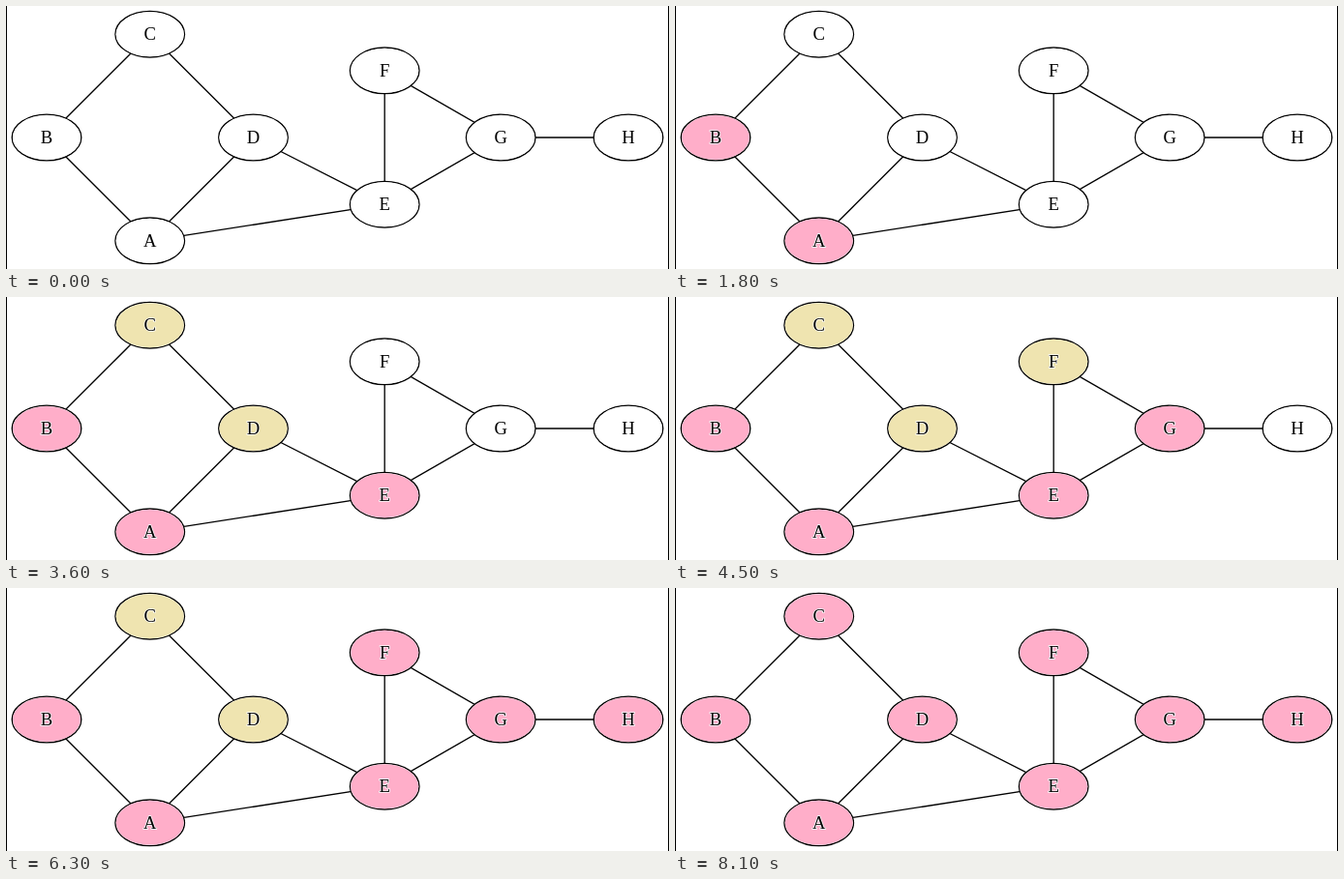
These frames come from a looping animation (685x272 px, 9000 ms). An HTML page:

```html
<!DOCTYPE html>
<html lang="en">
<head>
<meta charset="utf-8">
<title>Graph traversal</title>
<style>
  html, body { margin: 0; width: 100%; height: 100%; overflow: hidden; background: #fff; }
  svg { display: block; }
  line, .ring { stroke: #000; stroke-width: 1.33; fill: none; }
  .ring { fill: #fff; }
  .frame { stroke-width: 1; }
  text {
    font: 18.67px "Liberation Serif", "Times New Roman", serif;
    text-anchor: middle;
    paint-order: stroke;
    stroke: #fff;
    stroke-width: 1.5;
  }
</style>
</head>
<body>
<svg id="stage" width="685" height="272" viewBox="0 0 685 272"></svg>
<script>
const STEP = 900, LOOP = 9000;
const WHITE = '#fff', PINK = '#ffaec9', SAND = '#efe4b0';
const nodes = {
  A: [148.7, 242.8], B: [42, 136], C: [148.7, 29.2], D: [255.5, 136],
  E: [391.2, 205.2], F: [391.2, 66.8], G: [511.2, 136], H: [643, 136]
};
const edges = ['AB', 'BC', 'CD', 'AD', 'AE', 'DE', 'EF', 'EG', 'FG', 'GH'];
// Step at which each node is put on hold (sand) and visited (pink)
const held = { C: 3, D: 4, F: 5 };
const visited = { B: 1, A: 2, E: 4, G: 5, H: 6, F: 7, D: 8, C: 9 };

const stage = document.getElementById('stage');
function add(tag, attrs, text = '') {
  const el = document.createElementNS(stage.namespaceURI, tag);
  for (const key in attrs) el.setAttribute(key, attrs[key]);
  el.textContent = text;
  return stage.appendChild(el);
}

for (const x of [0.5, 684.5]) add('line', { class: 'frame', x1: x, y1: 0, x2: x, y2: 272 });
for (const [a, b] of edges) {
  const [x1, y1] = nodes[a], [x2, y2] = nodes[b];
  add('line', { x1, y1, x2, y2 });
}
const fills = {};
for (const name in nodes) {
  const [cx, cy] = nodes[name];
  add('ellipse', { class: 'ring', cx, cy, rx: 35.8, ry: 23.8 });
  fills[name] = add('ellipse', { cx, cy, rx: 35, ry: 23 });
  add('text', { x: cx, y: cy + 6 }, name);
}

function draw(time) {
  const step = Math.floor((time % LOOP) / STEP);
  for (const name in fills) {
    const color = step >= visited[name] ? PINK : step >= held[name] ? SAND : WHITE;
    fills[name].setAttribute('fill', color);
  }
}

const start = performance.now();
function tick() {
  draw(performance.now() - start);
  requestAnimationFrame(tick);
}
tick();
</script>
</body>
</html>
```
